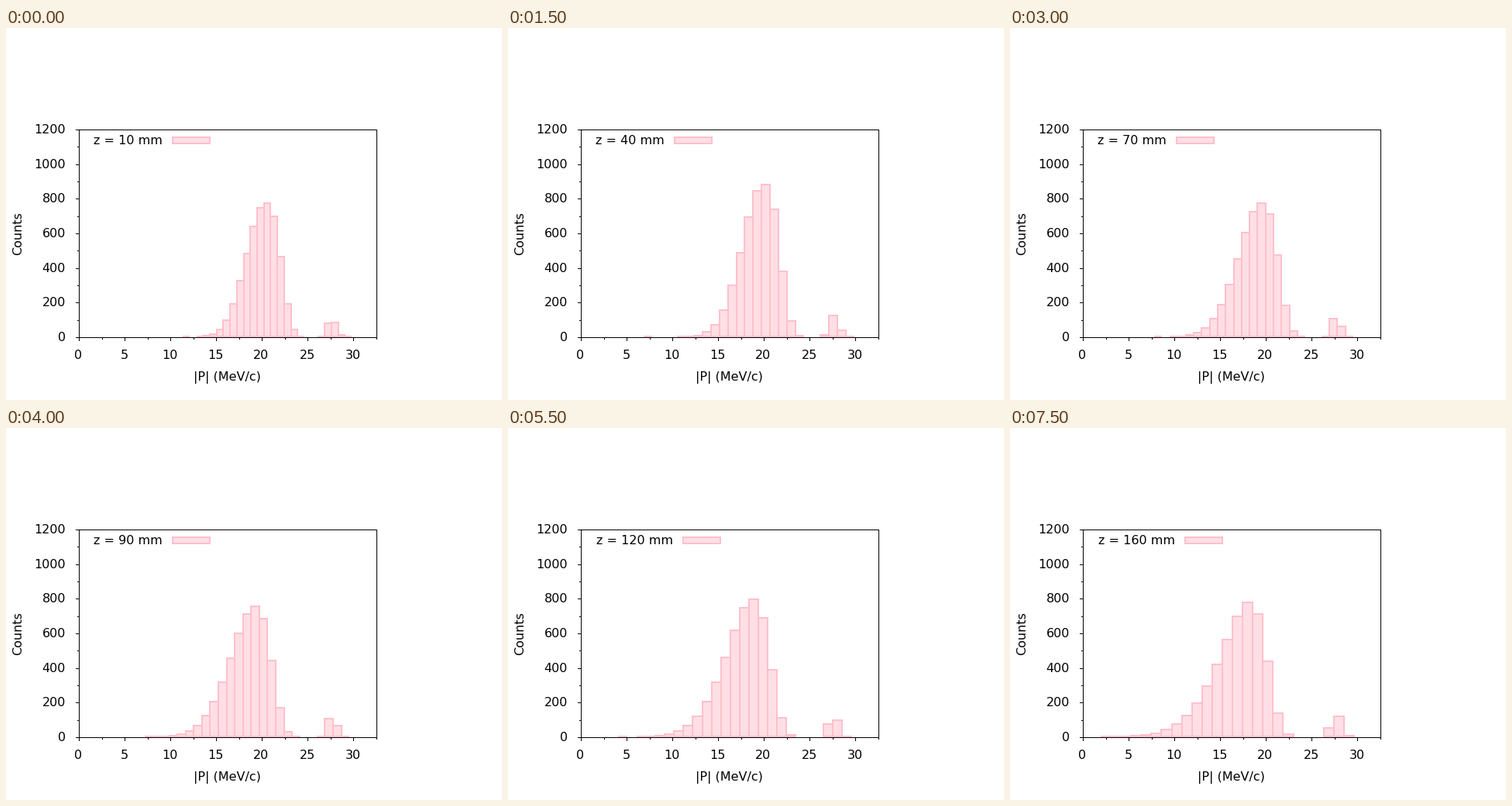
A matplotlib script that plays this animation: 640 by 480 pixels, repeating every 8 s.

```python
import numpy as np
import matplotlib.pyplot as plt
from matplotlib.animation import FuncAnimation
from matplotlib.patches import Rectangle

W, H, DPI = 640, 480, 100
PX = 72 / DPI                       # points per pixel
LEFT, RIGHT, TOP, BOTTOM = 94, 478, 131, 399
PER_MEV = (RIGHT - LEFT) / 32.5     # pixels per MeV/c
PER_COUNT = (BOTTOM - TOP) / 1200   # pixels per count
EDGE, FILL = "#ffc0cb", "#ffdfe5"
BINS, STEPS = 25, 16
GRID = np.arange(60, 480, 0.25)     # fine momentum axis, in pixels

plt.rcParams["font.family"] = "DejaVu Sans"
plt.rcParams["font.size"] = 16 * PX


def lobe(total, mode, left, right, p=2, q=2):
    """Cumulative counts of a peak with its own width and power on each side."""
    d = GRID - mode
    power = np.where(d < 0, np.abs(d / left) ** p, np.abs(d / right) ** q)
    c = np.cumsum(np.exp(-power / 2))
    return total * c / c[-1]


def edges(z):
    """The bins always span the whole range of the data."""
    lo = np.interp(z, [10, 40, 60, 90, 100, 120, 140, 160],
                   [228.1, 175, 189, 178.8, 142, 142, 120, 117])
    hi = np.interp(z, [10, 60, 70, 160], [446, 447, 443, 444])
    return np.linspace(lo, hi, BINS + 1)


def histogram(z):
    s = z - 10
    main = lobe(4740 - 1.2 * s, 335 - 0.187 * s, 24.7 + 0.063 * s,
                19.5 + 0.035 * s, 2 - 0.0029 * s, 2.8)
    side = lobe(182, 419, 4, 6.5)
    x = edges(z)
    n = np.diff(np.interp(x, GRID, main + side))
    n[[0, -1]] = np.maximum(n[[0, -1]], 2)
    return x, n


fig = plt.figure(figsize=(W / DPI, H / DPI), dpi=DPI, facecolor="white")
ax = fig.add_axes([0, 0, 1, 1])
ax.set(xlim=(0, W), ylim=(H, 0))
ax.axis("off")


def line(x0, y0, x1, y1):
    ax.plot([x0, x1], [y0, y1], color="black", lw=PX,
            solid_capstyle="projecting", zorder=3)


def box():
    return ax.add_patch(Rectangle((0, 0), 0, 0, fc=FILL, ec=EDGE, lw=2 * PX,
                                  joinstyle="miter", zorder=2))


for y in (TOP, BOTTOM):
    line(LEFT, y, RIGHT, y)
for x in (LEFT, RIGHT):
    line(x, TOP, x, BOTTOM)

for k in range(14):
    x = round(LEFT + 2.5 * k * PER_MEV)
    major = k % 2 == 0
    line(x, BOTTOM, x, BOTTOM + (4 if major else 2))
    if major:
        ax.text(x - .5, 427, f"{5 * k // 2}", ha="center")

for k in range(13):
    y = round(BOTTOM - 100 * k * PER_COUNT)
    major = k % 2 == 0
    line(LEFT - (4 if major else 2), y, LEFT, y)
    if major:
        ax.text(77, y + 5, f"{100 * k}", ha="right")

ax.text(285.5, 455, "|P| (MeV/c)", ha="center")
ax.text(16, 265.5, "Counts", ha="center", va="center", rotation=90)

label = ax.text(0, 150, "")
swatch = box()
bars = [box() for _ in range(BINS)]


def draw(k):
    z = 10 * (k + 1)
    wide = z >= 100
    label.set_text(f"z = {z} mm")
    label.set_x(114 if wide else 113)
    swatch.set_bounds(226 if wide else 215, 141, 48, 8)
    x, n = histogram(z)
    base = BOTTOM - 1
    for bar, x0, x1, c in zip(bars, x, x[1:], n):
        top = min(BOTTOM - c * PER_COUNT, base)
        bar.set_bounds(x0, top, x1 - x0, base - top)
        bar.set_visible(bool(c > 0.9))
    return [label, swatch, *bars]


anim = FuncAnimation(fig, draw, frames=STEPS, interval=500,
                     repeat=True, repeat_delay=0)
plt.show()
```
